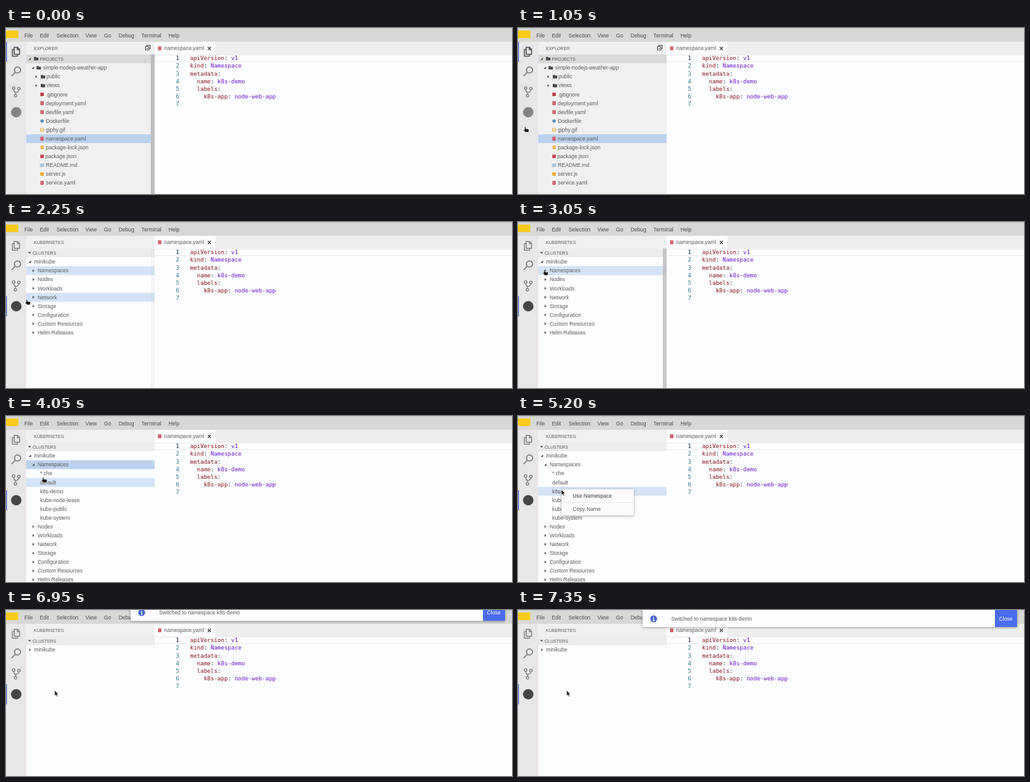
Recreate the animation shown at these times as an HTML page. Size 800 by 264 pixels, loop 8 s.

```html
<!DOCTYPE html>
<html lang="en">
<head>
<meta charset="utf-8">
<title>Switch namespace</title>
<style>
html, body { margin: 0; width: 100%; height: 100%; overflow: hidden; background: #fcfdfe; }
svg { display: block; width: 800px; height: 264px; }
text { font: 8.4px "Liberation Sans", Arial, sans-serif; fill: #5c5c5e; white-space: pre; }
text.caps { font-size: 7px; }
text.code { font: 9px "DejaVu Sans Mono", monospace; }
</style>
</head>
<body>
<svg id="stage" viewBox="0 0 800 264"></svg>
<script>
const LOOP = 8000, ROW = 14.08, TOP = 63.3;
const DARK = '#464649', GREY = '#858388', RED = '#c8414c', AMBER = '#eda62c', BLUE = '#5a8fb8';
const LIGHT_ROW = '#d4e3f5', FOCUS_ROW = '#bcd1ee';
const stage = document.getElementById('stage');
const rowY = i => TOP + ROW * i;

function add(parent, tag, attrs = {}, content) {
  const el = document.createElementNS('http://www.w3.org/2000/svg', tag);
  for (const key in attrs) el.setAttribute(key, attrs[key]);
  if (content !== undefined) el.textContent = content;
  parent.append(el);
  return el;
}
const group = (parent = stage) => add(parent, 'g');
const rect = (p, x, y, width, height, fill, more) => add(p, 'rect', { x, y, width, height, fill, ...more });
const fillPath = (p, d, fill) => add(p, 'path', { d, fill });
const line = (p, d, stroke, width = 1) =>
  add(p, 'path', { d, stroke, 'stroke-width': width, fill: 'none' });
const label = (p, x, middle, str, more) => add(p, 'text', { x, y: middle + 3, ...more }, str);
const caps = (p, x, middle, str) => add(p, 'text', { x, y: middle + 2.5, class: 'caps' }, str);
const show = (el, on) => el.setAttribute('visibility', on ? 'inherit' : 'hidden');

function arrow(p, x, y, open) {
  fillPath(p, open ? `M${x - 2} ${y + 1.8}h3.8v-3.8z` : `M${x - 1.2} ${y - 2.3}v4.6l2.8-2.3z`, '#4c4c4e');
}
function folder(p, x, y) {
  fillPath(p, `M${x} ${y - 2.8}h2.6l.8 .9h3.6v4.7h-7z`, '#47484b');
}

const icons = {
  yaml(p, x, y) {
    rect(p, x - 2.5, y - 3, 5, 6, RED, { rx: .6 });
    line(p, `M${x - 1.3} ${y - 1.3}h2.6M${x - 1.3} ${y + .9}h2.6`, '#f4d5d8', .7);
  },
  lock(p, x, y) {
    rect(p, x - 2.5, y - 2.8, 5, 5.8, AMBER, { rx: 1.3 });
    line(p, `M${x - 1.7} ${y - .6}h3.4M${x - 1.7} ${y + 1.2}h3.4`, '#fbe6bd', .6);
  },
  image(p, x, y) {
    rect(p, x - 2.5, y - 2.5, 5, 5, 'none', { stroke: AMBER, 'stroke-width': .9, rx: .8 });
    line(p, `M${x - 2} ${y + 1.8}l1.6-2 1 1 1.4-1`, AMBER, .8);
  },
  readme(p, x, y) {
    rect(p, x - 3, y - 2.3, 6, 4.6, '#c3d8e4', { stroke: '#8db2c6', 'stroke-width': .6 });
    line(p, `M${x - 1.8} ${y - .6}h3.6M${x - 1.8} ${y + 1}h3.6`, '#7fa6bb', .6);
  },
  square: color => (p, x, y) => rect(p, x - 2.7, y - 2.7, 5.4, 5.4, color),
  circle: color => (p, cx, cy) => add(p, 'circle', { cx, cy, r: 2.6, fill: color })
};

// Editor
rect(stage, 0, 0, 800, 264, '#fcfdfe');
rect(stage, 235, 22, 565, 20.5, '#eeeeee');
rect(stage, 235, 22, 96, 21, '#fcfdfe');
icons.yaml(stage, 243, 32.3);
label(stage, 250, 32, 'namespace.yaml', { fill: '#333' });
line(stage, 'M319 30l5 5M324 30l-5 5', '#333', 1.1);
line(stage, 'M236 43h564M236 53.3h564', '#ebe6ea');

const source = [
  [0, 'apiVersion', 'v1'], [0, 'kind', 'Namespace'], [0, 'metadata', ''],
  [1, 'name', 'k8s-demo'], [1, 'labels', ''], [2, 'k8s-app', 'node-web-app'], [0, '', '']
];
source.forEach(([indent, key, value], i) => {
  const y = 51.2 + 12.17 * i;
  add(stage, 'text', {
    x: 274, y, class: 'code', 'text-anchor': 'end', style: `fill:${i ? '#36758f' : '#17265f'}`
  }, i + 1);
  if (!key) return;
  const row = add(stage, 'text', { x: 291 + 10.84 * indent, y, class: 'code' });
  [[key, '#8a1019'], [':', '#222'], [value && ' ' + value, '#6512cf']].forEach(([str, color]) =>
    add(row, 'tspan', { style: `fill:${color}` }, str));
});

// File explorer
const explorer = group();
rect(explorer, 32, 22, 203, 242, '#f1f0f1');
rect(explorer, 32, 42, 203, 14, '#d9d9d8');
caps(explorer, 44, 32, 'EXPLORER');
rect(explorer, 222.5, 27.5, 5.5, 5.5, 'none', { stroke: DARK, 'stroke-width': 1 });
rect(explorer, 220.5, 29.5, 5.5, 5.5, '#f1f0f1', { stroke: DARK, 'stroke-width': 1 });
line(explorer, 'M221.8 32.3h3', DARK);
arrow(explorer, 37.3, 49, true);
folder(explorer, 44.3, 48.8);
caps(explorer, 53.5, 49, 'PROJECTS');
rect(explorer, 32, rowY(8) - 7, 203, ROW, FOCUS_ROW);
arrow(explorer, 42.5, rowY(0), true);
folder(explorer, 48.3, rowY(0));
label(explorer, 58.3, rowY(0), 'simple-nodejs-weather-app');
['public', 'views'].forEach((name, i) => {
  arrow(explorer, 47.8, rowY(i + 1), false);
  folder(explorer, 55, rowY(i + 1));
  label(explorer, 64, rowY(i + 1), name);
});
[
  ['.gitignore', icons.square('#b8383f')], ['deployment.yaml', icons.yaml],
  ['devfile.yaml', icons.yaml], ['Dockerfile', icons.circle(BLUE)],
  ['giphy.gif', icons.image], ['namespace.yaml', icons.yaml],
  ['package-lock.json', icons.lock], ['package.json', icons.square('#c23c48')],
  ['README.md', icons.readme], ['server.js', icons.square(AMBER)], ['service.yaml', icons.yaml]
].forEach(([name, icon], i) => {
  icon(explorer, 57, rowY(i + 3));
  label(explorer, name === 'package.json' ? 62 : 63, rowY(i + 3), name);
});

// Cluster view
const clusters = group();
rect(clusters, 32, 22, 203, 20, '#f0f0f0');
rect(clusters, 32, 42, 203, 14, '#ececec');
caps(clusters, 44, 32, 'KUBERNETES');
fillPath(clusters, 'M35 47.7h4.8l-2.4 2.9z', '#4c4c4e');
caps(clusters, 42, 49, 'CLUSTERS');
const selectedRow = rect(clusters, 32, 0, 203, ROW, LIGHT_ROW);
const hoveredRow = rect(clusters, 32, 0, 203, ROW, LIGHT_ROW);

const kinds = ['Nodes', 'Workloads', 'Network', 'Storage', 'Configuration', 'Custom Resources', 'Helm Releases'];
const namespaces = ['* che', 'default', 'k8s-demo', 'kube-node-lease', 'kube-public', 'kube-system'];
function buildTree(open, children) {
  const tree = group(clusters);
  let row = 0;
  const node = (x, name, isOpen) => {
    if (isOpen !== undefined) arrow(tree, x - 6.7, rowY(row), isOpen);
    label(tree, x, rowY(row++), name);
  };
  node(44.5, 'minikube', open);
  if (open) {
    node(50, 'Namespaces', children.length > 0);
    children.forEach(name => node(54, name));
    kinds.forEach(name => node(50, name, false));
  }
  return tree;
}
const trees = { closed: buildTree(false), kinds: buildTree(true, []), full: buildTree(true, namespaces) };

const scrollbar = rect(stage, 229, 42, 6, 222, '#bdbcc0');

// Menu bar
rect(stage, 0, 0, 800, 22, '#d8d8d6');
rect(stage, 0, 0, 800, 1.5, '#c9cec8');
rect(stage, 0, 4, 19.5, 12, '#f8ca1c');
[[29, 'File'], [53.5, 'Edit'], [80, 'Selection'], [125.5, 'View'], [155, 'Go'],
  [178, 'Debug'], [214, 'Terminal'], [257, 'Help']]
  .forEach(([x, name]) => label(stage, x, 11.5, name, { style: 'fill:#4a4a4a' }));

// Activity bar
rect(stage, 0, 22, 32, 242, '#e8e6e9');
const activeMark = rect(stage, 0, 22, 1.4, 32, '#5470c4');
const filesIcon = line(stage,
  'M13 30.8h5.2l3.3 3.3v7.6h-8.5zM18 31v3.4h3.4M13 34.3h-2.9v10.4h8.2v-3', DARK, 1.5);
line(stage, 'M23 66.8a4.8 4.8 0 1 1-9.6 0a4.8 4.8 0 1 1 9.6 0M14.8 70.3l-6 6', GREY, 1.9);
line(stage, 'M14 95.5a2 2 0 1 1-4 0a2 2 0 1 1 4 0M22.3 96.3a2 2 0 1 1-4 0a2 2 0 1 1 4 0' +
  'M17 107.8a2 2 0 1 1-4 0a2 2 0 1 1 4 0M12.3 97.5q0 4 2.7 5.2v3M20.2 98.3q0 3.6-5.2 4.4', GREY, 1.5);
const clusterIcon = add(stage, 'circle', { cx: 16.2, cy: 134, r: 8.3, fill: GREY });

// Context menu
const menu = group();
menu.style.filter = 'drop-shadow(0 1px 2px rgba(0,0,0,.35))';
rect(menu, 68.7, 116.5, 114.3, 41.5, '#fbfafc');
const menuHover = rect(menu, 68.7, 119, 114.3, 15, '#d8d6da');
line(menu, 'M69 137.5h114', '#e6e4e8', .8);
label(menu, 86.5, 127, 'Use Namespace', { style: 'fill:#3c3c3e' });
label(menu, 86.5, 148, 'Copy Name');

// Notification
const notice = group();
const card = rect(notice, 197, 0, 592, 27, '#fdfcfe');
card.style.filter = 'drop-shadow(0 1px 2px rgba(0,0,0,.35))';
add(notice, 'circle', { cx: 214.5, cy: 14, r: 5.4, fill: '#4563d0' });
line(notice, 'M214.5 10.6v1.5M213.3 13.3h1.3v3.4M213.1 16.8h2.9', '#fff', 1.2);
label(notice, 242, 14, 'Switched to namespace k8s-demo');
rect(notice, 754, 0, 35, 27, '#4a6bee');
label(notice, 760.5, 14, 'Close', { style: 'fill:#fff' });

// Pointers
const pointer = group();
const outline = { fill: '#111', stroke: '#fff', 'stroke-width': .5 };
const hand = add(pointer, 'path', {
  d: 'M-1 -1.2q.9-1.2 1.7 0v2.4l4.1.8q1 .5.8 1.8l-.6 3h-4.9l-2.9-3.7q.4-1.4 1.8-.3z', ...outline
});
const tip = add(pointer, 'path', { d: 'M0 0v8.4l1.9-1.7 1.4 3 1.4-.6-1.4-2.9h2.6z', ...outline });

// Pointer path: time, x, y
const route = [
  [0, -8, 236], [50, -3, 230], [700, 10, 170], [850, 11, 165], [1050, 11.5, 159],
  [1250, 14.5, 135], [2100, 14.5, 135], [2250, 33, 125], [2450, 39, 103], [2600, 39, 103],
  [3050, 42, 78], [3750, 42, 78], [4050, 59, 99], [4550, 68.5, 117], [5850, 68.5, 117], [6200, 77, 128]
];
const clamp = v => Math.min(1, Math.max(0, v));
const ramp = (t, from, to) => clamp((t - from) / (to - from));

function pointerAt(t) {
  const next = route.findIndex(stop => stop[0] > t);
  if (next < 0) return route[route.length - 1].slice(1);
  const [t0, x0, y0] = route[next - 1], [t1, x1, y1] = route[next];
  const k = (t - t0) / (t1 - t0);
  return [x0 + (x1 - x0) * k, y0 + (y1 - y0) * k];
}
function placeRow(el, index) {
  el.setAttribute('y', rowY(index) - 7);
}

function draw(t) {
  const [x, y] = pointerAt(t);
  const inClusters = t >= 1450, expanded = t >= 3400, menuOpen = t >= 5200 && t < 6550;
  const collapsed = t >= 6850;

  show(explorer, !inClusters);
  show(clusters, inClusters);
  activeMark.setAttribute('y', inClusters ? 118 : 22);
  filesIcon.setAttribute('stroke', inClusters ? GREY : DARK);
  clusterIcon.setAttribute('fill', inClusters ? DARK : GREY);

  show(trees.closed, collapsed);
  show(trees.kinds, !expanded);
  show(trees.full, expanded && !collapsed);

  show(selectedRow, inClusters && !collapsed);
  placeRow(selectedRow, t < 5200 ? 1 : 4);
  selectedRow.setAttribute('fill', expanded && t < 5200 ? FOCUS_ROW : LIGHT_ROW);
  const row = Math.floor((y - TOP + 7) / ROW);
  show(hoveredRow, inClusters && x > 32 && t < 5200 && !(expanded && row === 1));
  placeRow(hoveredRow, row);

  const barOpacity = t < 1450 ? 1 - ramp(t, 200, 800)
    : expanded ? 0 : .12 + .68 * ramp(t, 2250, 2600);
  scrollbar.setAttribute('opacity', barOpacity);

  show(menu, menuOpen);
  show(menuHover, t >= 5950);
  const slide = 1 - (1 - ramp(t, 6800, 7150)) ** 2;
  show(notice, slide > 0);
  notice.setAttribute('transform', `translate(0 ${-30 * (1 - slide)})`);

  show(hand, t < 5200);
  show(tip, t >= 5200);
  pointer.setAttribute('transform', `translate(${x} ${y})`);
}

const start = performance.now();
function tick() {
  draw((performance.now() - start) % LOOP);
  requestAnimationFrame(tick);
}
tick();
</script>
</body>
</html>
```
